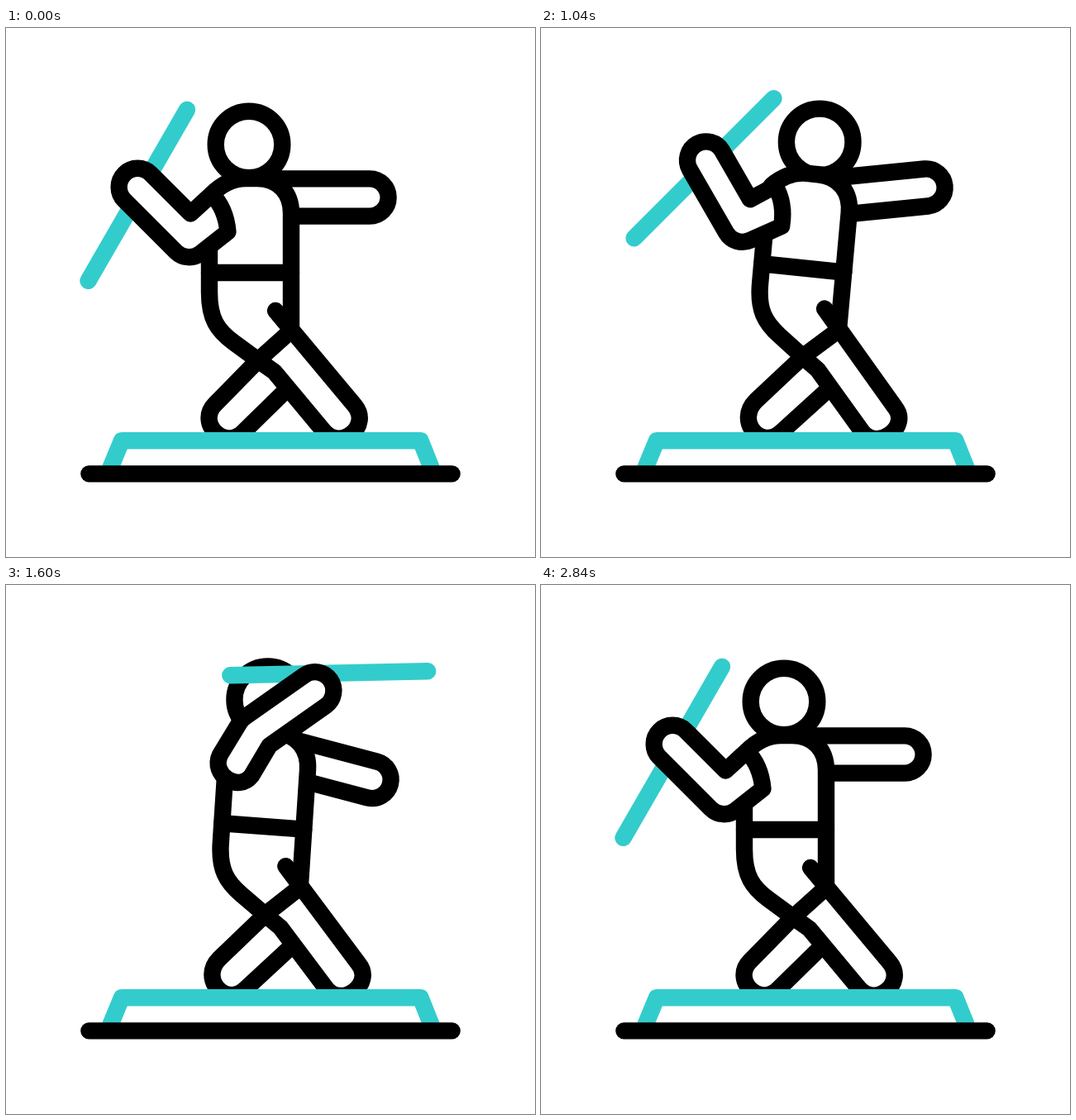
These frames come from a looping animation (640x640 px, 3000 ms). An HTML page with a canvas:

```html
<!DOCTYPE html>
<html lang="en">
<head>
<meta charset="utf-8">
<title>Javelin thrower</title>
<style>
html, body { margin: 0; width: 100%; height: 100%; overflow: hidden; background: #fff; }
canvas { display: block; width: 640px; height: 640px; }
</style>
</head>
<body>
<canvas id="stage" width="640" height="640"></canvas>
<script>
const ctx = document.getElementById('stage').getContext('2d');
const LOOP = 3000, STEP = 40;
const BLACK = '#000', TEAL = '#33cccc', WIDTH = 20.4;
const HALF = 22.6, FOREARM = 88, SPEAR = 119.5;
const RELEASE = 1600;
const rad = Math.PI / 180;

// lean, head: body tilt and extra head shift; ax..ty: rear arm axis;
// upper, fore: front arm angles; len: upper arm; open: sleeve shape
const REST  = { lean: 0, head: 0, ax: 305, ay: 205, tx: 440, ty: 205, upper: 142, fore: 225, len: 40, open: 0 };
const BACK  = { lean: -.06, head: -8.5, ax: 300, ay: 205.7, tx: 418, ty: 188, upper: 123, fore: 209, len: 40, open: 0 };
const AHEAD = { lean: .09, head: 8, ax: 340, ay: 205.5, tx: 466, ty: 193, upper: 156, fore: 240, len: 40, open: 0 };
const THROW = { lean: .09, head: -1.5, ax: 341, ay: 207, tx: 448, ty: 245, upper: 337, fore: 348, len: 46, open: 1 };

const lead = [[0, REST], [200, REST], [520, BACK], [1040, AHEAD], [1400, BACK], [1670, THROW], [2200, THROW]];
const bodyKeys = [...lead, [2760, REST], [LOOP, REST]];
const armKeys = [...lead, [2840, REST], [LOOP, REST]];

const lerp = (a, b, k) => a + (b - a) * k;
const clamp = x => Math.max(0, Math.min(1, x));
const ease = (t, a, b) => { const k = clamp((t - a) / (b - a)); return k * k * (3 - 2 * k); };
const polar = (p, deg, r) => [p[0] + r * Math.cos(deg * rad), p[1] + r * Math.sin(deg * rad)];

function poseAt(keys, t) {
  let i = 0;
  while (i < keys.length - 2 && t >= keys[i + 1][0]) i++;
  const [t0, a] = keys[i], [t1, b] = keys[i + 1];
  const k = ease(t, t0, t1), out = {};
  for (const name in a) out[name] = lerp(a[name], b[name], k);
  return out;
}

// Tilts the figure over its planted feet.
function bend(lean, x, y) {
  const grip = clamp((495 - y) / 100);
  return [x + lean * (532 - y), y + 1.15 * lean * (x - 350) * grip];
}

function bentPath(lean, d) {
  return new Path2D(d.replace(/([\d.]+),([\d.]+)/g, (_, x, y) => bend(lean, +x, +y).join(',')));
}

function paint(path, color, fill) {
  if (fill) { ctx.fillStyle = '#fff'; ctx.fill(path); }
  ctx.strokeStyle = color;
  ctx.stroke(path);
}

function drawRearArm(p) {
  const a = Math.atan2(p.ty - p.ay, p.tx - p.ax) / rad;
  const root = [p.ax, p.ay], path = new Path2D();
  path.moveTo(...polar(root, a - 90, HALF));
  path.arc(p.tx, p.ty, HALF, (a - 90) * rad, (a + 90) * rad);
  path.lineTo(...polar(root, a + 90, HALF));
  paint(path, BLACK, true);
}

function drawHead(p) {
  const [x, y] = bend(p.lean, 294, 141);
  const path = new Path2D();
  path.arc(x + p.head, y + 30 * Math.abs(p.lean), 40.3, 0, 7);
  paint(path, BLACK, true);
}

function drawBody(lean) {
  const shape = d => bentPath(lean, d);
  const shoulder = '249,201 C262,188 275,182 290,182 L304,182 C330,182 345,200 345,224 L345,366';
  const side = '246,240 L246,320 C246,352 256,366 275,380 L305,402';
  ctx.fillStyle = '#fff';
  ctx.fill(shape('M' + shoulder + ' L305,402 L246,320 L246,240 Z'));
  paint(shape('M' + shoulder), BLACK);
  paint(shape('M246,296 L345,296'), BLACK);
  ctx.save();
  ctx.beginPath();
  ctx.rect(0, 0, 640, 490);
  ctx.clip();
  paint(shape('M' + side + ' L324.7,416 L384.3,487.6 C405,512.5 442.4,481.3 421.7,456.4 L326,342'), BLACK);
  paint(shape('M345,366 L305,402 L253,455 C230.4,477.6 264.4,511.6 287,489 L340,437'), BLACK);
  ctx.restore();
}

function armJoints(lean, p) {
  const [x, y] = bend(lean, 253, 230);
  const joint = [x + 7 * p.open, y - 7 * p.open];
  const elbow = polar(joint, p.upper, p.len);
  return { joint, elbow, hand: polar(elbow, p.fore, FOREARM) };
}

function drawFrontArm(lean, p) {
  const { joint, elbow, hand } = armJoints(lean, p);
  const u = p.upper, v = p.fore;
  // Sleeve points: along the upper arm toward the chest, then across it.
  const sleeve = (x0, y0, x1, y1) =>
    polar(polar(joint, u + 180, lerp(x0, x1, p.open)), u + 90, lerp(y0, y1, p.open));
  const path = new Path2D();
  path.arc(...hand, HALF, (v - 90) * rad, (v + 90) * rad);
  path.lineTo(...polar(elbow, (u + v) / 2 + 90, HALF / Math.cos((v - u) / 2 * rad)));
  path.lineTo(...sleeve(14.5, 25.3, 0, HALF));
  path.bezierCurveTo(...sleeve(16.5, 10, 30, HALF), ...sleeve(12, -7, 30, -HALF), ...sleeve(2, -22.5, 0, -HALF));
  path.arc(...elbow, HALF, (u - 90) * rad, (v - 90) * rad);
  path.closePath();
  paint(path, BLACK, true);
}

function heldSpear(t) {
  const p = poseAt(armKeys, t);
  const { hand } = armJoints(poseAt(bodyKeys, t).lean, p);
  const q = ease(t, 1400, 1670) / ease(RELEASE, 1400, 1670);
  const grip = polar([0, 0], p.fore - 135, 10);
  return {
    mid: [hand[0] + lerp(grip[0], 17, q), hand[1] + lerp(grip[1], -21, q)],
    angle: p.fore + 75 - 41 * q
  };
}

function spearAt(t) {
  if (t <= RELEASE) return heldSpear(t);
  if (t < 2200) {
    const s = heldSpear(RELEASE), dt = t - RELEASE;
    return { mid: [s.mid[0] + 2.1 * dt, s.mid[1] + .03 * dt], angle: s.angle + .02 * dt };
  }
  // A fresh spear slides in from above.
  const s = heldSpear(0);
  return { mid: polar(s.mid, s.angle, 400 * (1 - ease(t, 2200, 2840))), angle: s.angle };
}

function drawSpear(t) {
  const { mid, angle } = spearAt(t);
  const path = new Path2D();
  path.moveTo(...polar(mid, angle, SPEAR));
  path.lineTo(...polar(mid, angle, -SPEAR));
  paint(path, TEAL);
}

function draw(t) {
  const body = poseAt(bodyKeys, t), arm = poseAt(armKeys, t);
  ctx.fillStyle = '#fff';
  ctx.fillRect(0, 0, 640, 640);
  ctx.lineWidth = WIDTH;
  ctx.lineCap = ctx.lineJoin = 'round';
  drawRearArm(body);
  drawHead(body);
  drawBody(body.lean);
  drawSpear(t);
  drawFrontArm(body.lean, arm);
  ctx.lineCap = 'butt';
  paint(new Path2D('M126,533 L140,499.2 L501.5,499.2 L515,533'), TEAL);
  ctx.lineCap = 'round';
  paint(new Path2D('M100.4,539.4 L539.6,539.4'), BLACK);
}

const start = performance.now();
function tick() {
  const t = (performance.now() - start) % LOOP;
  draw(Math.min(2840, Math.floor(t / STEP) * STEP));
  requestAnimationFrame(tick);
}
tick();
</script>
</body>
</html>
```
